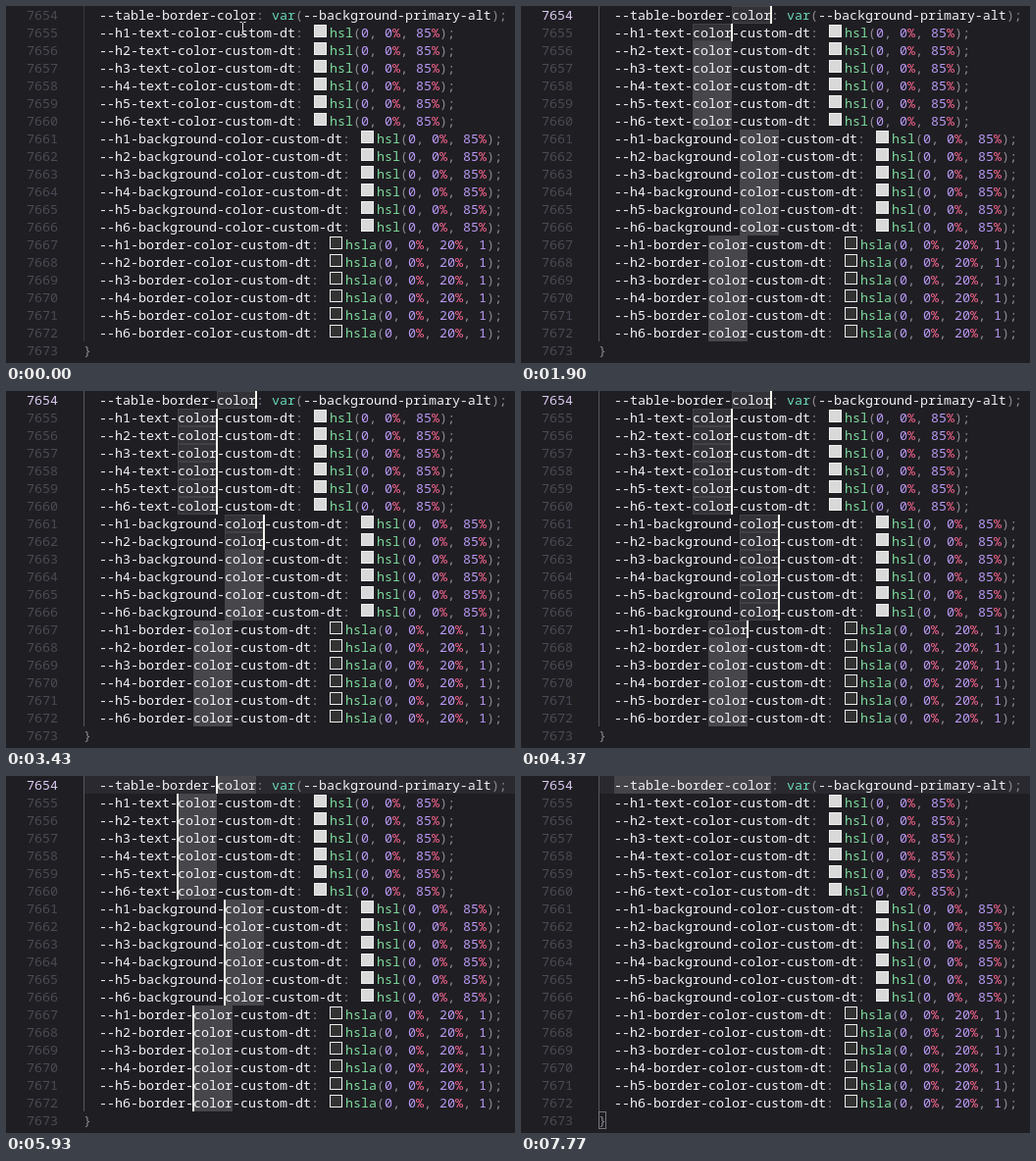
Write an HTML page that moves like this. It is 519x364 px and loops after 8000 ms.

```html
<!DOCTYPE html>
<html lang="en">
<head>
<meta charset="utf-8">
<title>Multi-cursor editing</title>
<style>
  html, body { margin: 0; width: 100%; height: 100%; overflow: hidden; background: #1f1e23; }
  #stage {
    position: relative; width: 519px; height: 364px; overflow: hidden;
    font: 500 13.333px/18px "Noto Sans Mono", "DejaVu Sans Mono", monospace;
    font-variant-ligatures: none; color: #f3f2f5;
  }
  .line { position: absolute; left: 0; width: 519px; height: 18px; white-space: pre; }
  .line > * { position: absolute; top: 0; height: 18px; }
  .num { left: 21px; color: #4b4a53; }
  .num.active { color: #dccbf3; }
  .code { left: 95px; }
  .current { left: 79px; right: 0; background: #2a292f; }
  .guide { position: absolute; left: 79px; top: 0; width: 1px; height: 342px; background: #3a393f; }
  .guide.active { background: #57565c; }
  .mark { box-sizing: border-box; width: 40px; background: #47464a; }
  .mark.selected { background: #333237; border: 1px solid #424145; }
  .word { left: 95px; width: 160px; background: #454448; }
  .caret { width: 2px; background: #f6f4ee; }
  .match { left: 79px; width: 8px; box-sizing: border-box; border: 1px solid #77767c; }
  .swatch {
    display: inline-block; box-sizing: border-box; width: 13px; height: 13px;
    margin: 0 3px; border: 1px solid #eee; vertical-align: baseline;
  }
  .p { color: #8d8a93; }
  .v { color: #69d8b2; }
  .f { color: #7edb9c; }
  .n { color: #b99af5; }
  .u { color: #fc6690; }
  #mouse { position: absolute; left: -4px; top: -8px; }
</style>
</head>
<body>
<div id="stage"></div>
<script>
const LOOP = 8000, CHAR = 8, ROW = 18, LEFT = 95;
const CLICK = 840, WORD_ON = 1100, SELECT = 1370, MARKS_ON = 1430;
const COLLAPSE = 5870, MARKS_OFF = 6000, WORD_BACK = 6200, BLINK_OFF = 7770;

// When each line's "color" joins the selection
const joins = [SELECT, 1900, 2200, 2430, 2630, 2830, 3070,
               3270, 3430, 3630, 3800, 4000, 4170,
               4370, 4570, 4770, 4970, 5170, 5370];
// Caret steps to the right after the selection collapses
const steps = [6370, 6600, 6830, 7270];

const stage = document.getElementById("stage");
const span = (cls, text) => `<span class="${cls}">${text}</span>`;

function add(parent, cls, html = "") {
  const el = document.createElement("div");
  el.className = cls;
  el.innerHTML = html;
  parent.append(el);
  return el;
}

function colorValue(name, light, alpha) {
  const comma = span("p", ", ");
  const percent = n => span("n", n) + span("u", "%");
  return `<span class="swatch" style="background:hsl(0,0%,${light}%)"></span>` +
    span("f", name) + span("p", "(") +
    [span("n", 0), percent(0), percent(light), ...(alpha ? [span("n", alpha)] : [])].join(comma) +
    span("p", ");");
}

const rows = [{
  name: "--table-border-color",
  value: span("v", "var") + span("p", "(") + "--background-primary-alt" + span("p", ");")
}];
for (const kind of ["text", "background", "border"])
  for (let h = 1; h <= 6; h++)
    rows.push({
      name: `--h${h}-${kind}-color-custom-dt`,
      value: kind === "border" ? colorValue("hsla", 20, 1) : colorValue("hsl", 85)
    });

function addLine(i) {
  const line = add(stage, "line");
  line.style.top = i * ROW + "px";
  return { line, num: add(line, "num", 7654 + i) };
}

let current, word;
const lines = rows.map(({ name, value }, i) => {
  const { line, num } = addLine(i);
  const x = LEFT + name.indexOf("color") * CHAR;
  if (i === 0) {
    current = add(line, "current");
    word = add(line, "word");
  }
  const mark = add(line, "mark");
  mark.style.left = x + "px";
  add(line, "code", name + span("p", ": ") + value);
  return { num, mark, x, caret: add(line, "caret") };
});

const last = addLine(rows.length).line;
add(last, "code", span("p", "}")).style.left = "79px";
const match = add(last, "match");
const guide = add(stage, "guide");

stage.insertAdjacentHTML("beforeend",
  `<svg id="mouse" width="9" height="16" fill="none">
    <path d="M1.5 1.5H3.5L4.5 2.5L5.5 1.5H7.5M4.5 2.5V13.5M1.5 14.5H3.5L4.5 13.5L5.5 14.5H7.5" stroke="#e4e4e4"/>
  </svg>`);
const mouse = document.getElementById("mouse");

const show = (el, on) => { el.style.visibility = on ? "visible" : "hidden"; };

function caretOffset(t, join) {
  if (t >= COLLAPSE) return steps.filter(s => t >= s).length;
  return t >= join ? 5 : 4;
}

function draw(t) {
  lines.forEach(({ mark, caret, x }, i) => {
    const join = joins[i];
    const selected = t >= join && t < COLLAPSE;
    show(mark, selected || (t >= MARKS_ON && t < MARKS_OFF));
    mark.classList.toggle("selected", selected);

    const clicked = i === 0 && t >= CLICK && t < CLICK + 500;
    show(caret, clicked || (t >= join && t < BLINK_OFF));
    caret.style.left = x + caretOffset(t, join) * CHAR - 1 + "px";
  });

  const placed = t >= CLICK && t < SELECT;
  lines[0].num.classList.toggle("active", t >= CLICK);
  guide.classList.toggle("active", t >= CLICK);
  show(current, placed || t >= COLLAPSE);
  show(word, (t >= WORD_ON && t < SELECT) || t >= WORD_BACK);
  show(match, placed || t >= MARKS_OFF);

  const p = Math.min(1, Math.max(0, (t - 100) / 670));
  const ease = p * p * (3 - 2 * p);
  mouse.style.transform =
    `translate(${Math.round(241 + 8 * ease)}px, ${Math.round(23 - 15 * ease)}px)`;
  show(mouse, t < joins[1]);
}

const start = performance.now();
function tick() {
  draw((performance.now() - start) % LOOP);
  requestAnimationFrame(tick);
}
tick();
</script>
</body>
</html>
```
